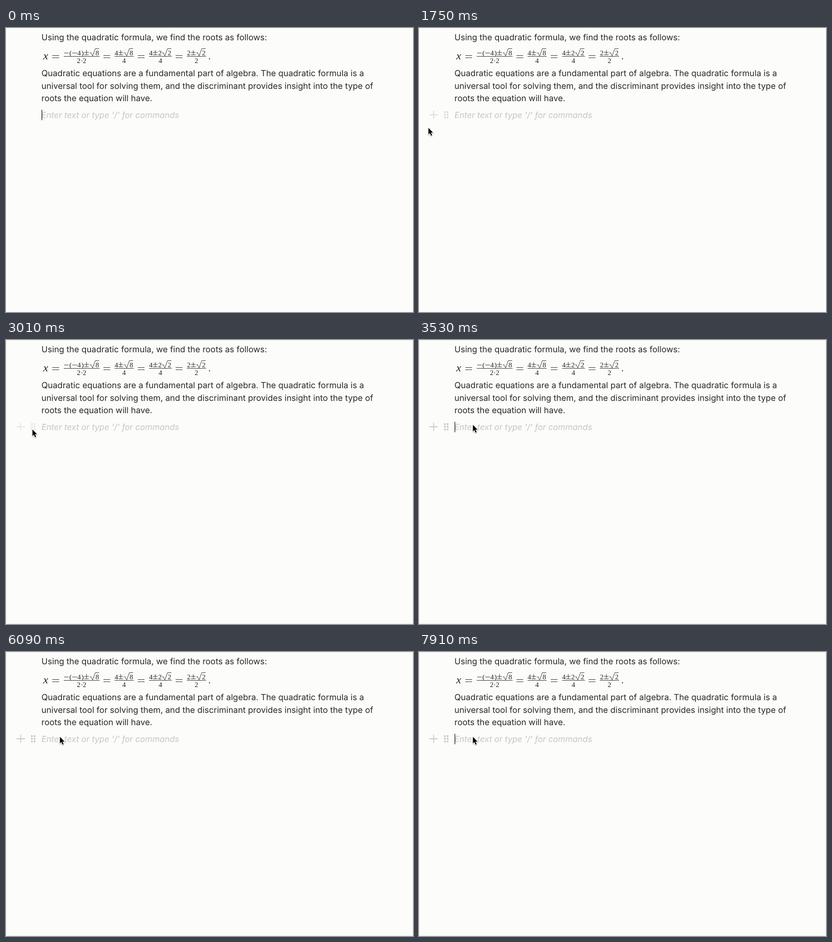
These frames come from a looping animation (896 by 625 pixels, 8000 ms). An HTML page:

```html
<!DOCTYPE html>
<html lang="en">
<head>
<meta charset="utf-8">
<style>
  html, body { margin: 0; width: 100%; height: 100%; overflow: hidden; background: #fcfcfb; }
  svg { display: block; }
  .body { font: 18.46px Inter, sans-serif; fill: #292929; text-rendering: geometricPrecision; }
  .hint { font-size: 18.33px; font-style: italic; fill: #c5c5c5; }
  .math { font: 15.6px "Liberation Serif", serif; fill: #222; text-anchor: middle; }
  .lines { fill: none; stroke: #222; stroke-width: .95; }
</style>
</head>
<body>
<svg width="896" height="625" viewBox="0 0 896 625">
  <g class="body">
    <text x="78" y="27">Using the quadratic formula, we find the roots as follows:</text>
    <text x="78" y="106">Quadratic equations are a fundamental part of algebra. The quadratic formula is a</text>
    <text x="78" y="133.6">universal tool for solving them, and the discriminant provides insight into the type of</text>
    <text x="78" y="161.2">roots the equation will have.</text>
    <text class="hint" x="78" y="198">Enter text or type '/' for commands</text>
  </g>
  <g class="math" id="math">
    <text x="87.3" y="69.3" font-style="italic" style="font-size:24px">x</text>
    <text x="448" y="69.3" style="font-size:20px">.</text>
  </g>
  <path class="lines" id="strokes"/>
  <g id="handle">
    <path d="M23 191H41.5M32.3 182V200" stroke="#c8c8c8" stroke-width="1.8"/>
    <path d="M57 185.2h0M63 185.2h0M57 191h0M63 191h0M57 196.8h0M63 196.8h0"
      stroke="#c5c5c5" stroke-width="4.2" stroke-linecap="round"/>
  </g>
  <path id="caret" d="M79 180V203" stroke="#222" stroke-width="1.4"/>
  <rect id="frame" x=".5" y=".5" width="895" height="624" fill="none" stroke="#ebebdf"/>
  <path id="pointer" d="M.8 .8V15.2L4 12.1 6.5 17.9 8.8 16.9 6.4 11.2H10.8Z" fill="#000" stroke="#fff"
    stroke-width="2" paint-order="stroke" style="filter:drop-shadow(0 1px 1px #0005)"/>
</svg>
<script>
const get = id => document.getElementById(id);
const math = get("math"), handle = get("handle"), caret = get("caret");
const frame = get("frame"), pointer = get("pointer");

// Fractions: [bar left, bar right, denominator, root argument, numerator glyphs as [glyph, x]]
const fractions = [
  [127, 206, "2·2", 8, [["−", 133], ["(", 142], ["−", 151], ["4", 161], [")", 168.5], ["±", 177.3]]],
  [239, 281, "4", 8, [["4", 243], ["±", 252.6]]],
  [315, 365, "4", 2, [["4", 319], ["±", 328.6], ["2", 339]]],
  [398, 440.5, "2", 2, [["2", 402.5], ["±", 412.3]]]
];
let strokes = "";

function glyph(text, x, y) {
  const node = document.createElementNS("http://www.w3.org/2000/svg", "text");
  node.setAttribute("x", x);
  node.setAttribute("y", y);
  node.textContent = text;
  math.append(node);
}

for (const [left, right, below, root, above] of fractions) {
  strokes += `M${left} 62.5H${right}`;
  strokes += `M${right - 21.5} 55.5l2.2-1.6 4 7.6L${right - 9.5} 45.5H${right - 1}`;
  glyph(below, (left + right) / 2, 76.7);
  glyph(root, right - 5, 59.5);
  for (const [char, x] of above) {
    if (char === "−") strokes += `M${x - 5} 55h10`;
    else if (char === "±") strokes += `M${x - 5} 53.7h10m-5-5v10M${x - 5} 59h10`;
    else glyph(char, x, 59.5);
  }
}
for (const x of [102, 214.5, 290, 373.5]) strokes += `M${x} 60.5h15m-15 5h15`;
get("strokes").setAttribute("d", strokes);

const LOOP = 8000, BLINK = 1630;
// Pointer path: [time, x, y]
const path = [
  [1030, 2, 196], [1350, 12, 209], [1750, 20, 219], [2170, 19, 222], [2310, 18, 222],
  [2550, 0, 215], [2750, -14, 210], [2800, -14, 208], [3200, 118, 186]
];

const clamp = v => Math.max(0, Math.min(1, v));
const smooth = v => v * v * (3 - 2 * v);

function pointerAt(t) {
  const next = path.findIndex(key => key[0] > t);
  if (next < 0) return path.at(-1).slice(1);
  if (next === 0) return [-40, 0];
  const [t0, x0, y0] = path[next - 1], [t1, x1, y1] = path[next];
  const p = smooth((t - t0) / (t1 - t0));
  return [x0 + (x1 - x0) * p, y0 + (y1 - y0) * p];
}

function draw(now) {
  const t = now % LOOP;
  pointer.setAttribute("transform", `translate(${pointerAt(t)})`);
  caret.style.opacity = Math.floor((t + 10) / BLINK) % 2 ? 0 : 1;
  handle.style.opacity = t < 2400
    ? clamp((t - 1500) / 400) * clamp((2400 - t) / 150)
    : clamp((t - 2900) / 250);
  frame.style.opacity = t > 2800 ? 1 : 0;
  requestAnimationFrame(draw);
}
requestAnimationFrame(draw);
</script>
</body>
</html>
```
